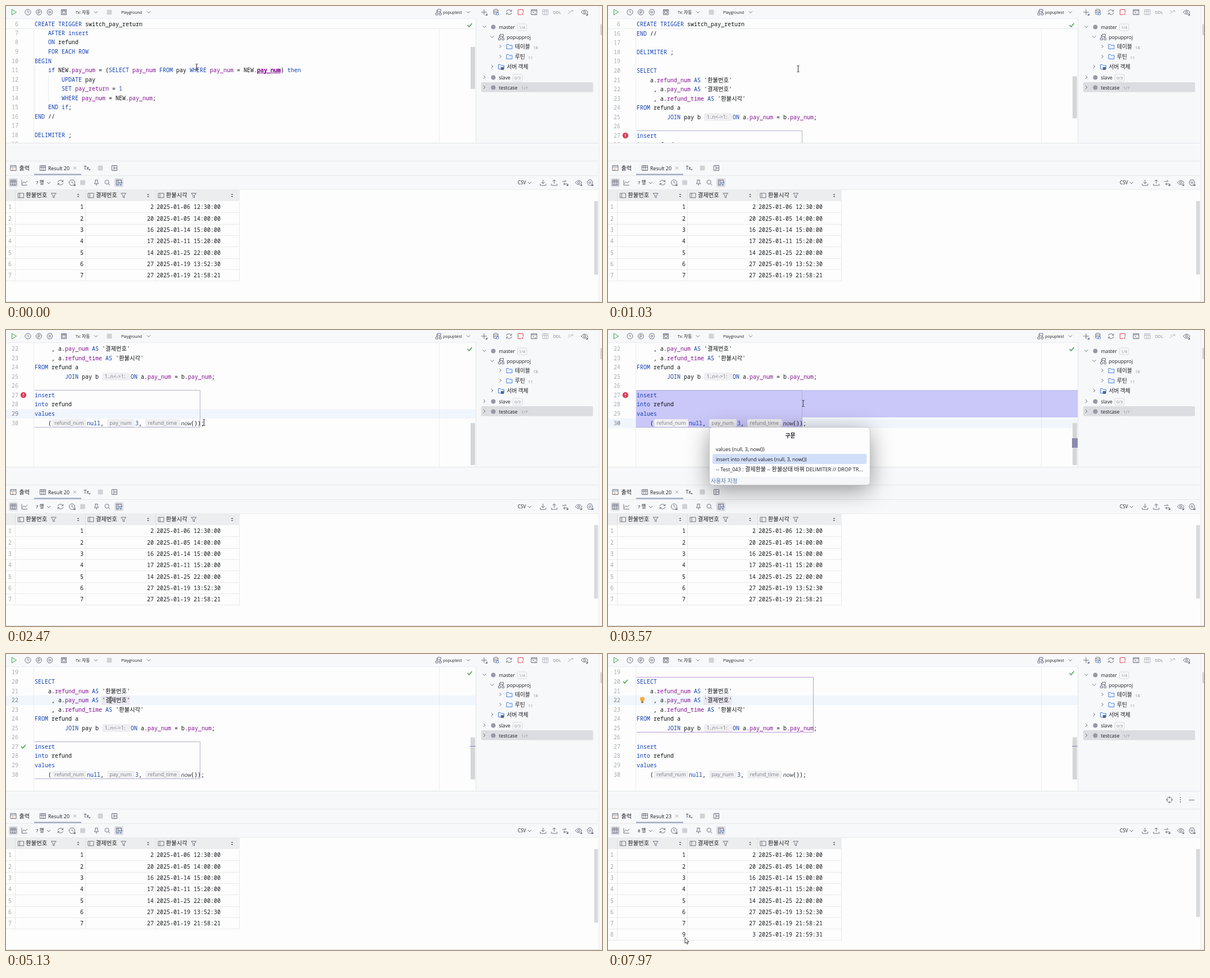
Recreate the animation shown at these times as an HTML page. Size 1061 px wide and 528 px high, loop 8 s.

```html
<!DOCTYPE html>
<html lang="ko">
<head>
<meta charset="utf-8">
<title>SQL trigger test</title>
<style>
@property --s { syntax: '<number>'; inherits: true; initial-value: 0; }
html, body { margin: 0; width: 100%; height: 100%; overflow: hidden; background: #fcfcfc; }
svg { display: block; width: 1061px; height: 528px; animation: scroll 8s linear infinite; }
text { font-family: 'Open Sans', 'Noto Sans CJK KR', 'Noto Sans CJK JP', sans-serif; white-space: pre; stroke: none; }
.m { font-family: 'Noto Sans Mono', 'Noto Sans CJK KR', 'Liberation Mono', monospace; font-weight: 500; }
.k { fill: #1440b5; }
.f { fill: #871094; }
.n { fill: #1750eb; }
#code { transform: translateY(calc(-68px - var(--s) * 1px)); }
#thumb { transform: translateY(calc(var(--s) * .3536px)); }
#sticky { animation: sticky 8s linear infinite; }
#mouse { animation: mouse 8s ease-in-out infinite; }
#spin { animation: spin .8s steps(8) infinite; }
#popup { filter: drop-shadow(0 9px 20px rgba(0, 0, 0, .42)); }
@keyframes scroll {
  0%, 3.75% { --s: 0; animation-timing-function: ease-out }
  6.25% { --s: 49.5; animation-timing-function: ease-out }
  8.75% { --s: 99; animation-timing-function: ease-out }
  11.25%, 16.9% { --s: 148 }
  19.5%, 20% { --s: 234; animation-timing-function: ease-out }
  21.8%, 57.5% { --s: 263; animation-timing-function: ease-out }
  60%, 100% { --s: 214 }
}
@keyframes sticky {
  0%, 16.9% { transform: none }
  17.5%, 100% { transform: translateY(-22px) }
}
@keyframes mouse {
  0% { transform: translate(339px, 109px) }
  12.5% { transform: translate(338px, 112px) }
  19.5%, 20% { transform: translate(332px, 116px) }
  31%, 35% { transform: translate(352px, 165px) }
  41%, 55% { transform: translate(347px, 131px) }
  62%, 86% { transform: translate(186px, 82px) }
  92%, 100% { transform: translate(137px, 506px) }
}
@keyframes spin { to { transform: rotate(360deg) } }
</style>
</head>
<body>
<script>
const LOOP = 8000, PITCH = 16.55;
const GRAY = '#6c707e', INK = '#1b1c20';
// key moments in ms
const CLICK30 = 2600, OPEN = 3400, PICK = 4150, INSERTED = 4250, CLICK22 = 5000, DONE = 6730;
let rules = '', ruleCount = 0;

const at = (x, y, s) => `<g transform="translate(${x} ${y})">${s}</g>`;
const rect = (x, y, w, h, fill, extra = '') =>
  `<rect x="${x}" y="${y}" width="${w}" height="${h}" fill="${fill}" stroke="none" ${extra}/>`;
const path = (d, stroke = GRAY, extra = '') => `<path d="${d}" stroke="${stroke}" ${extra}/>`;
const hangul = (s, size) => s.replace(/[가-힣]+/g, m => `<tspan font-size="${size}">${m}</tspan>`);
const text = (x, y, s, size = 8.7, fill = INK, extra = '') =>
  `<text x="${x}" y="${y + size * .36}" font-size="${size}" fill="${fill}" ${extra}>${hangul(s, size * 1.12)}</text>`;
const mono = (x, y, s, fill = '#101114', extra = '') =>
  `<text class="m" x="${x}" y="${y + 4}" font-size="10" fill="${fill}" ${extra}>${s}</text>`;

// shows its content only between two times of the loop
function during(from, to, s) {
  const pc = t => t / LOOP * 100 + '%', name = 'show' + ruleCount++;
  rules += `@keyframes ${name}{0%{opacity:${from ? 0 : 1}}` +
    (from ? `${pc(from)}{opacity:1}` : '') + (to < LOOP ? `${pc(to)}{opacity:0}` : '') + '}';
  return `<g style="animation:${name} 8s step-end infinite">${s}</g>`;
}

const icon = {
  down: path('M-3-1.5L0 1.5 3-1.5'),
  right: path('M-1.5-3L1.5 0-1.5 3'),
  clock: '<circle r="5"/>' + path('M0-3V0L2 1.5'),
  gear: path('M-2.5-4.8H2.5L5 0 2.5 4.8H-2.5L-5 0Z') + '<circle r="1.7"/>',
  refresh: path('M-4.8-.8A4.7 4.2 0 0 1 4-2M4.8.8A4.7 4.2 0 0 1-4 2M4.6-4.5V-1.6H1.7M-4.6 4.5V1.6H-1.7'),
  stop: rect(-4.5, -4.5, 9, 9, '#d0d2d6', 'rx="1.5"'),
  table: path('M-5-4.5H5V4.5H-5ZM-5-1.5H5M-1.7-4.5V4.5M1.7-4.5V4.5'),
  column: path('M-5-4H5V4H-5ZM-2-4V4', '#70747f'),
  funnel: path('M-4.5-4H4.5L1.2 0V4L-1.2 3V0Z'),
  sort: path('M-2-1L0-3.2 2-1ZM-2 1L0 3.2 2 1Z', 'none', 'fill="#5d616b"'),
  schema: path('M-2-5H4V-1H-2ZM-5 1.5H-1V5H-5ZM1.5 1.5H5V5H1.5ZM-3 1.5V-3H-2M3-1V1.5'),
  folder: path('M-5-4H-1.5L0-2.5H5V4H-5Z', '#4f82e0', 'fill="#eaf1ff"'),
  eye: path('M-6 0Q0-7.5 6 0Q0 7.5-6 0Z') + '<circle r="1.8"/>',
  check: path('M-4 0L-1.2 3 4-3', '#4aa657', 'stroke-width="1.7"'),
  corner: path('M6 2V6H2Z', 'none', `fill="${GRAY}"`),
  swap: path('M-5-2H2M0-4.5L2.5-2M5 2.5H-2M0 0L-2.5 2.5 0 5'),
  error: '<circle r="5.2" fill="#d9405a" stroke="none"/>' + path('M0-2.8V.6M0 2.3V2.9', '#fff', 'stroke-width="1.5"'),
  brand: '<circle r="4" fill="#9599a3" stroke="none"/>'
};
const put = (name, x, y) => at(x, y, icon[name]);

const lines = [
  '    AFTER insert', '    ON refund', '    FOR EACH ROW', 'BEGIN',
  '    if NEW.pay_num = (SELECT pay_num FROM pay WHERE pay_num = NEW.pay_num) then',
  '        UPDATE pay', '        SET pay_return = 1', '        WHERE pay_num = NEW.pay_num;',
  '    END if;', 'END //', '', 'DELIMITER ;', '', 'SELECT',
  "    a.refund_num AS '환불번호'", "     , a.pay_num AS '결제번호'", "     , a.refund_time AS '환불시각'",
  'FROM refund a', '         JOIN pay b', '', 'insert', 'into refund', 'values', '    ('
];
const words = /\b(CREATE|TRIGGER|AFTER|insert|ON|FOR|EACH|ROW|BEGIN|if|SELECT|FROM|WHERE|then|UPDATE|SET|END|DELIMITER|AS|JOIN|into|values|null)\b|\b(pay_num|refund_num|refund_time|pay_return)\b|\b(\d+)\b/g;
const paint = s => s.replace(words, (m, key, field) => `<tspan class="${key ? 'k' : field ? 'f' : 'n'}">${m}</tspan>`);
const rowY = n => Math.round(n * PITCH);
const code = (x, n, s) => mono(x, rowY(n), hangul(paint(s), 10.35));
const lineNo = (n, y, fill = '#a9adb6') => mono(22, y, n, fill, 'text-anchor="end"');
const caretRow = n => rect(0, rowY(n) - 8, 836, 17, '#f1f6fd') + lineNo(n, rowY(n), '#4c505b');
const hint = (x, w, n, s) => rect(x, rowY(n) - 7, w, 14, '#efeff1', 'rx="3"') + text(x + 4.5, rowY(n) - .3, s, 9.1, '#7b7e86');
const frame = (from, to, right, top, color) =>
  path(`M51 ${rowY(from) - top + .5}H${right - .5}V${rowY(to) + 7.5}H51`, color);

function codeArea() {
  const body = lines.map((s, i) => {
    const n = i + 7, lead = s.search(/\S|$/);
    return lineNo(n, rowY(n)) + code(51 + lead * 6, n, s.trim());
  }).join('');
  const under = during(0, CLICK30, caretRow(29)) + during(CLICK30, CLICK22, caretRow(30)) +
    during(CLICK22, LOOP, caretRow(22) + rect(170, rowY(22) - 8, 51, 17, '#e9e7f0')) +
    during(OPEN, PICK, rect(50, rowY(27) - 9, 786, 49, '#cac7f9') + rect(50, rowY(30) - 10, 296, 18, '#cac7f9'));
  const frames = during(0, DONE, frame(27, 30, 346, 9, '#b1b1d2')) +
    during(DONE, LOOP, frame(20, 25, 366, 8, '#bf97dd'));
  const marks = during(0, INSERTED, put('error', 31, rowY(27))) +
    during(INSERTED, DONE, put('check', 31, rowY(27))) + during(DONE, LOOP, put('check', 31, rowY(20)));
  const bulb = '<circle cy="-1.5" r="4" fill="#f5ad31" stroke="none"/>' + rect(-2, 2, 4, 3.5, '#8d7c62', 'rx="1"');
  return `<g id="code">${under}` +
    path(`M51.5 ${rowY(11) - 8}V${rowY(15) + 8}M75.5 ${rowY(12) - 8}V${rowY(14) + 8}`, '#ececf0') +
    hint(171, 50, 25, '1..n&lt;-&gt;1:') + hint(82, 61, 30, 'refund_num') + hint(180, 49, 30, 'pay_num') + hint(248, 62, 30, 'refund_time') +
    frames + body +
    path(`M447 ${rowY(11) + 5.5}H489`, '#871094') + mono(447, rowY(11), 'pay_num', '#871094', 'style="font-weight:700"') +
    code(222, 25, 'ON a.pay_num = b.pay_num;') + code(144, 30, 'null,') + code(230, 30, '3,') +
    mono(311, rowY(30), '<tspan font-style="italic" fill="#45474d">now</tspan>());') +
    marks + during(7200, LOOP, at(61, rowY(22), bulb)) + '</g>';
}

function editor() {
  return '<g clip-path="url(#edit)">' + rect(0, 22, 836, 222, '#fcfdfc') +
    codeArea() + path('M49.5 22V244M771.5 22V244', 'rgba(20, 25, 70, .07)') +
    '<g id="sticky">' + rect(0, 22, 836, 18.5, '#fcfdfc') + path('M0 40.5H836', '#e6e7ea') +
    lineNo(6, 32) + mono(51, 32, paint('CREATE TRIGGER switch_pay_return')) + '</g>' +
    put('check', 825.5, 34) + `<g id="thumb">${rect(827, 73, 8, 75, '#d5d6d8')}</g>` +
    during(OPEN, PICK, rect(826, 193, 10, 17, '#8b8bad')) +
    during(CLICK22, LOOP, path('M826 164.5H836', '#7c8bc0')) + '</g>' +
    path('M0 244.5H1055M836.5 22V244', '#e3e4e8');
}

function topBar() {
  return path('M10.5 6L18.5 11 10.5 16Z', '#45a455', 'fill="#eef8ef"') +
    put('clock', 39, 11) + at(58.5, 11, '<circle r="5"/>' + path('M-1.5 3.2V-2.5H.4A1.6 1.6 0 0 1 .4 1H-1.5')) +
    put('gear', 78, 11) + at(103, 11, path('M-4.5-4.5H4.5V4.5H-4.5ZM-2.5-2H2.5V2.5H-2.5ZM-4.5-3H4.5')) +
    text(124, 11, 'Tx: 자동', 7) + put('down', 160, 11) + put('stop', 184, 11) +
    text(205, 11, 'Playground', 7) + put('down', 254, 11) +
    put('schema', 770, 11) + text(778, 11, 'popuptest', 7) + put('down', 823, 11) +
    at(851, 11, path('M-5 0H5M0-5V5') + icon.corner) +
    at(872, 11, path('M-4-3.5V3Q0 6 4 3V-3.5M-4 0Q0 2.5 4 0') + '<ellipse cy="-3.5" rx="4" ry="1.7"/>' + '<circle cx="3" cy="3" r="2" fill="#f7f8fa" stroke="#4f82e0"/>') +
    put('refresh', 895.5, 11) + at(916, 11, path('M-4.5-4.5H4.5V4.5H-4.5Z', '#db4a55') + rect(1, 1, 5, 5, '#f7f8fa') + path('M2 2L5 5M5 2L2 5', '#db4a55')) +
    at(940, 11, path('M-5-4.5H5V4.5H-5ZM-5-2.5H5M-2.5-.7L-.5 1-2.5 2.7M.8 2.7H3')) +
    `<g opacity=".45">${put('table', 960, 11)}${at(1005, 11, path('M-5 3L4-3M1-3H4V0M-4-2H-1'))}</g>` +
    text(974, 11, 'DDL', 7, '#7c808b') + at(1030, 11, icon.eye + icon.corner);
}

function tree() {
  const badge = (x, y, s) => `<rect x="${x}" y="${y - 6}" width="16.5" height="12" rx="2" stroke="#d8dade"/>` + text(x + 2.5, y, s, 7.5, '#8b8f98');
  const node = (x, y, open, kind, name) => put(open ? 'down' : 'right', x, y - 1) + put(kind, x + 16, y - .5) + text(x + 26, y, name, 8.7);
  return rect(846, 136, 199, 17.5, '#dcdde0', 'rx="2"') +
    node(851.5, 38, 1, 'brand', 'master') + badge(910.5, 38, '1/4') +
    node(865.5, 56, 1, 'schema', 'popupproj') +
    node(880, 73, 0, 'folder', '테이블') + text(938.5, 74, '18', 7.5, '#8b8f98') +
    node(880, 91, 0, 'folder', '루틴') + text(929.5, 92, '11', 7.5, '#8b8f98') +
    node(865.5, 109, 0, 'folder', '서버 객체') + rect(881, 109, 5, 5, '#596780') +
    node(851.5, 128, 0, 'brand', 'slave') + badge(902.5, 128, '0/3') +
    node(851.5, 146, 0, 'brand', 'testcase') + badge(915, 146, '1/7') +
    rect(1058, 32, 3, 20, '#d3d4d7', 'rx="1.5"') + path('M1055.5 0V528', '#ececef');
}

function resultBars() {
  const pressed = x => rect(x - 8, 307, 16, 16, '#dcdee3', 'rx="3"');
  return path('M0 276.5H1055M0 302.5H1055', '#e6e7ea') +
    at(13, 289, path('M-5-4.5H5V4.5H-5ZM-5-2H5') + path('M-2 0L0 2-2 4', '#e0793c')) + text(23.5, 289.5, '출력', 9) +
    put('table', 65.5, 289) + during(0, DONE, text(75, 290, 'Result 20', 8.9)) + during(DONE, LOOP, text(75, 290, 'Result 23', 8.9)) +
    path('M120 286.5L125 291.5M125 286.5L120 291.5', '#9a9da6') + rect(50, 299.5, 84, 2, '#929db9') +
    text(138.5, 289, 'Tx', 8.7) + path('M147 293H150V290Z', 'none', `fill="${GRAY}"`) + put('stop', 168, 289) +
    at(193, 289, path('M-4.5-4.5H4.5V4.5H-4.5ZM-1-4.5V4.5M-1 0H4.5')) +
    pressed(13) + put('table', 13, 315) + at(33, 315, path('M-5-4.5V4.5H5M-4 2L-1-1.5 1 1 5-3')) +
    during(0, DONE, text(53, 315.5, '7 행', 7.8)) + during(DONE, LOOP, text(53, 315.5, '8 행', 7.8)) + put('down', 76, 315.5) +
    put('refresh', 97, 315) + at(117.5, 315, icon.clock + icon.corner) + put('stop', 136.5, 315) +
    at(161, 315, path('M-2.5-4.5H2.5M-2-4.5V0L-4 2H4L2 0V-4.5M0 2V5.5')) +
    at(180.5, 315, '<circle cx="-.8" cy="-.8" r="3.6"/>' + path('M2 2L4.8 4.8')) +
    pressed(201) + at(201, 315, path('M-4.5-4.5H4.5V0M-1.5-4.5V4.5M-4.5-4.5V4.5H0') + path('M0 0H6L4 2.3V5L2 4V2.3Z', '#4472d8', 'fill="#e4edff"')) +
    text(911, 315.5, 'CSV', 8.2) + put('down', 932, 315.5) +
    at(956, 315, path('M0-5V2M-3-1L0 2 3-1M-5 2V5H5V2')) + at(976, 315, path('M0 2V-5M-3-2L0-5 3-2M-5 2V5H5V2')) +
    at(995, 315, icon.swap + icon.corner) + at(1019.5, 315, icon.eye + icon.corner) + at(1039.5, 315, icon.gear + icon.corner);
}

function grid() {
  const rows = [
    [1, 2, '06 12:30:00'], [2, 20, '05 14:00:00'], [3, 16, '14 15:00:00'], [4, 17, '11 15:20:00'],
    [5, 14, '25 22:00:00'], [6, 27, '19 13:52:30'], [7, 27, '19 21:58:21'], [9, 3, '19 21:59:31']
  ];
  const heads = [[26.5, '환불번호', 128.5], [151, '결제번호', 253], [276, '환불시각', 402.5]];
  const end = 'text-anchor="end"';
  const row = ([id, pay, time], i) => {
    const y = Math.round(358.4 + i * 20.28), b = y + 10.5;
    return mono(10, y, i + 1, '#a3a6ae', end) + mono(138, y, id, INK, end) + mono(263, y, pay, INK, end) +
      mono(268, y, '2025-01-' + time, INK) + path(`M0 ${b}H416M16.5 ${b - 20}V${b}M141.5 ${b - 20}V${b}M266.5 ${b - 20}V${b}M415.5 ${b - 20}V${b}`, '#e9eae8');
  };
  const spinner = Array.from({length: 8}, (_, i) =>
    `<path d="M0-5.5V-9.5" stroke="#a9a9a9" stroke-width="2.6" opacity="${.4 + i * .07}" transform="rotate(${i * 45})"/>`).join('');
  return rect(0, 328, 1055, 199, '#fcfdfc') + rect(0, 328, 416, 20, '#ecedee') +
    path('M0 327.5H1055', '#ececef') + path('M16.5 328V348M141.5 328V348M266.5 328V348', '#dfe0e3') +
    heads.map(([x, name, s]) => put('column', x, 338) + text(x + 8.7, 338, name, 9.25) + put('funnel', x + 58.3, 338) + put('sort', s, 338)).join('') +
    rows.slice(0, 7).map(row).join('') + during(DONE, LOOP, row(rows[7], 7)) +
    during(0, DONE, rect(1047, 348, 7, 131, '#d9dadc')) + during(DONE, LOOP, rect(1047, 348, 7, 121, '#d9dadc')) +
    during(6770, 6950, at(526, 414, `<g id="spin" stroke-linecap="round">${spinner}</g>`)) +
    path('M0 527.5H1061', '#dfe0e4');
}

function popup() {
  return '<g id="popup">' + rect(181, 174, 285, 102, '#fdfdfe', 'rx="5"') + '</g>' +
    path('M181 262H466V271Q466 276 461 276H186Q181 276 181 271Z', 'none', 'fill="#f5f6f8"') +
    '<rect x="180.5" y="173.5" width="286" height="103" rx="5" stroke="#c4c6cd"/>' +
    text(324.5, 189, '구문', 8.7, INK, 'text-anchor="middle" font-weight="700"') +
    rect(186, 221, 274.5, 18, '#d2dff8', 'rx="3"') +
    text(192, 212.5, 'values (null, 3, now())', 8.95) +
    text(192, 230.5, 'insert into refund values (null, 3, now())', 8.95) +
    text(192, 248.5, '-- Test_043 : 결제환불 -- 환불상태 바꿔 DELIMITER // DROP TR...', 9.05) +
    text(183, 270, '사용자 지정', 8.8, '#5474a6');
}

const hoverTools = at(999.5, 260, '<circle r="4.7"/>' + path('M0-6V-2.5M0 6V2.5M-6 0H-2.5M6 0H2.5')) +
  [-4, 0, 4].map(d => `<circle cx="1019" cy="${260 + d}" r="1" fill="${GRAY}" stroke="none"/>`).join('') + path('M1034 260.5H1044');
const mouse = '<g id="mouse">' +
  during(0, 7080, path('M-1.5-5.5H0L.5-5 1-5.5H2.5M.5-5V5M-1.5 5.5H0L.5 5 1 5.5H2.5', '#303030')) +
  during(7080, LOOP, path('M0 0V10L2.3 8 4 11.5 5.6 10.8 4 7.4H7Z', '#222', 'fill="#fff" stroke-width=".9"')) + '</g>';

const scene = '<clipPath id="edit"><rect y="23" width="837" height="221"/></clipPath>' +
  rect(0, 0, 1061, 528, '#f7f8fa') + topBar() + path('M0 22.5H836', '#ebecf0') + editor() + tree() +
  resultBars() + grid() + during(7150, LOOP, hoverTools) + during(OPEN, PICK, popup()) + mouse;
document.head.insertAdjacentHTML('beforeend', `<style>${rules}</style>`);
document.body.insertAdjacentHTML('beforeend', `<svg viewBox="0 0 1061 528" fill="none" stroke="${GRAY}">${scene}</svg>`);
</script>
</body>
</html>
```
